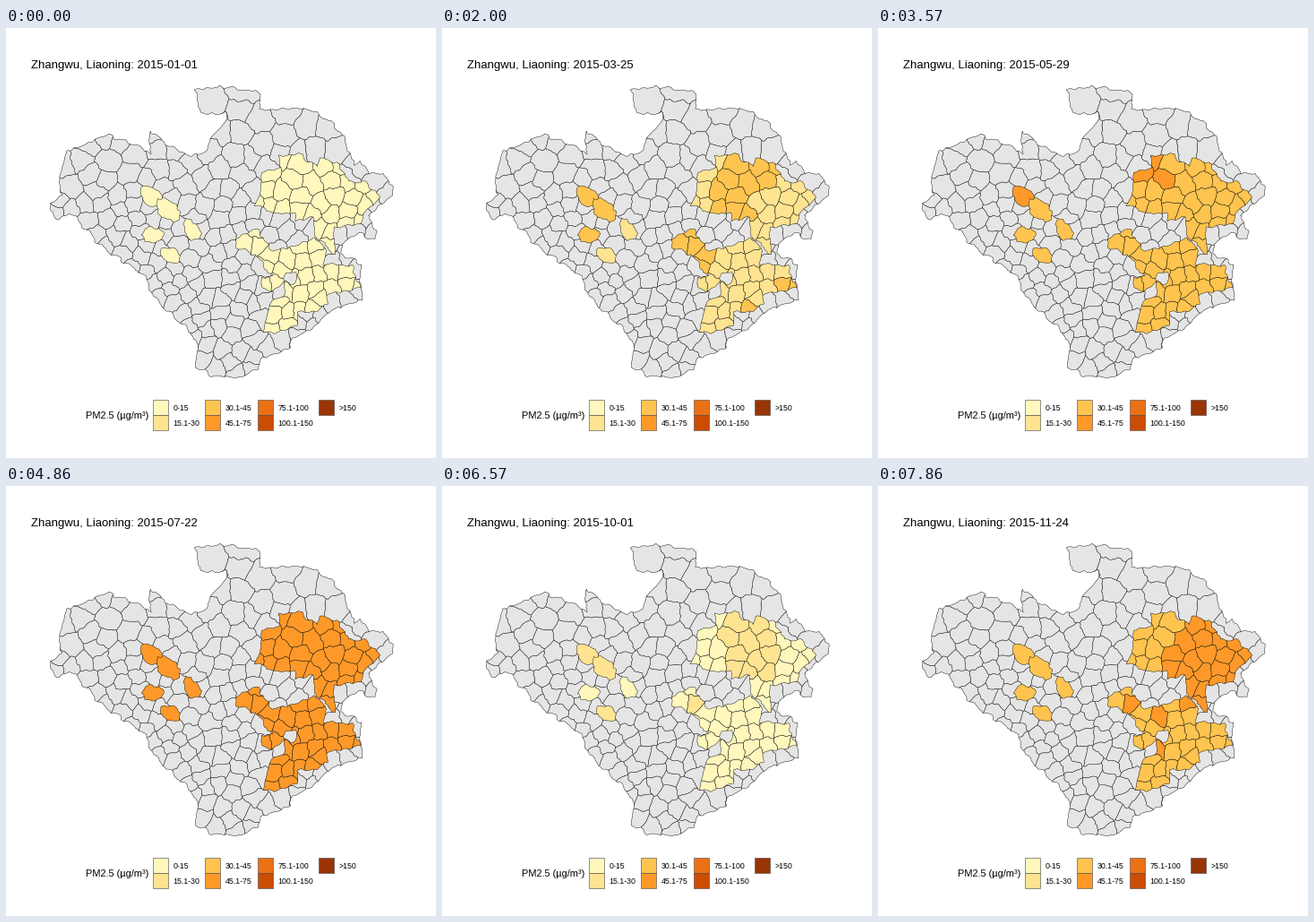
Write a matplotlib script that moves like this. It is 480x480 px and loops after 8 s.

```python
import numpy as np
import matplotlib.pyplot as plt
from matplotlib.animation import FuncAnimation
from matplotlib.collections import PolyCollection
from matplotlib.patches import Polygon, Rectangle
from matplotlib.path import Path

SIZE, LOOP_MS, TICK_MS = 480, 8000, 40
STEPS, DAYS_PER_STEP = 56, 5.938
START = np.datetime64("2015-01-01")
GREY, INK, LINE = "#e5e5e5", "black", 0.42
RAMP = np.array(["#fff7bc", "#fee391", "#fec44f", "#fe9929",
                 "#ec7014", "#cc4c02", "#993404"])
LABELS = ["0-15", "15.1-30", "30.1-45", "45.1-75",
          "75.1-100", "100.1-150", ">150"]

plt.rcParams["font.family"] = "Liberation Sans"
rng = np.random.default_rng(15)

# Key corners; the noise in rough() supplies the ragged detail.
REGION = [
    (48, 197), (63, 187), (59, 166), (66, 138), (95, 127), (113, 119),
    (150, 133), (162, 141), (161, 114), (179, 130), (205, 143), (224, 138),
    (229, 122), (247, 102), (245, 96), (218, 95), (210, 69), (238, 65),
    (285, 72), (282, 91), (338, 90), (366, 107), (377, 122), (388, 153),
    (396, 149), (405, 162), (420, 163), (432, 176), (430, 188), (403, 210),
    (414, 226), (411, 237), (393, 229), (374, 241), (374, 252), (398, 264),
    (394, 284), (399, 303), (364, 314), (345, 333), (317, 349), (318, 357),
    (283, 370), (280, 381), (262, 390), (233, 389), (212, 378), (215, 358),
    (207, 340), (168, 304), (154, 276), (108, 245), (72, 206), (57, 214)]
NORTH_EAST = [
    (304, 143), (326, 140), (347, 155), (350, 144), (372, 152), (382, 171),
    (403, 172), (417, 190), (400, 206), (397, 218), (367, 222), (367, 253),
    (346, 232), (341, 211), (322, 216), (322, 206), (300, 207), (278, 197),
    (285, 186), (286, 161), (304, 157)]
SOUTH_EAST = [
    (346, 234), (358, 249), (355, 264), (386, 265), (395, 290), (358, 297),
    (361, 306), (345, 317), (324, 317), (326, 331), (298, 342), (289, 338),
    (296, 306), (310, 298), (311, 284), (296, 294), (286, 290), (286, 279),
    (297, 277), (279, 254), (257, 244), (257, 235), (275, 226), (282, 224),
    (294, 248), (312, 247)]

# (step, class of most counties, hot spots one class higher as x, y, radius)
KEYS = [
    (0, 0, []),
    (9, 0, [(162, 188, 9), (338, 309, 9)]),
    (20, 3, []),
    (25, 2, [(162, 188, 9), (306, 158, 20)]),
    (34, 3, []),
    (46, 0, [(172, 195, 14), (184, 254, 9), (283, 238, 10), (348, 183, 36)]),
    (55, 2, [(375, 197, 56), (283, 238, 9), (317, 253, 9), (315, 294, 8)]),
]

WAVES = [(wl, *rng.uniform(0, 2 * np.pi, 3)) for wl in (5, 6.5, 9, 13, 19)]


def rough(corners):
    """Subdivide a closed polygon and shake it with a fixed noise field."""
    p = np.asarray(corners, float)
    parts = []
    for a, b in zip(p, np.roll(p, -1, axis=0)):
        n = max(1, int(np.hypot(*(b - a)) / 1.2))
        parts.append(a + (b - a) * (np.arange(n) / n)[:, None])
    pts = np.vstack(parts)
    out = pts.copy()
    for wl, turn, push, phase in WAVES:
        k = 2 * np.pi / wl
        s = np.sin(k * (pts @ [np.cos(turn), np.sin(turn)]) + phase)
        out += 0.065 * wl * s[:, None] * [np.cos(push), np.sin(push)]
    return out


def blob(x, y, a, b, tilt=0):
    """Eight-cornered oval, tilted by degrees."""
    t, r = np.arange(8) * np.pi / 4, np.radians(tilt)
    u, v = a * np.cos(t), b * np.sin(t)
    return np.column_stack([x + u * np.cos(r) - v * np.sin(r),
                            y + u * np.sin(r) + v * np.cos(r)])


def scatter(edge, gaps=()):
    """Spaced random county centres; counties shrink towards the south."""
    darts = rng.uniform(np.min(edge, axis=0), np.max(edge, axis=0), (9000, 2))
    ok = Path(edge).contains_points(darts)
    for g in gaps:
        ok &= ~Path(g).contains_points(darts)
    seeds = []
    for p in darts[ok]:
        gap = np.interp(p[1], [80, 200, 280], [21, 14.5, 13])
        if not seeds or np.hypot(*(np.array(seeds) - p).T).min() > gap:
            seeds.append(p)
    return np.array(seeds)


def voronoi(seeds):
    """Roughened Voronoi cells, each cut from a box around its seed."""
    box = np.array([(-60, -60), (60, -60), (60, 60), (-60, 60)])
    cells = []
    for s in seeds:
        poly = s + box
        near = np.argsort(np.hypot(*(seeds - s).T))[1:32]
        for o in seeds[near]:
            d = (poly - (s + o) / 2) @ (o - s)
            cut = []
            for p, q, dp, dq in zip(poly, np.roll(poly, -1, axis=0),
                                    d, np.roll(d, -1)):
                if dp <= 0:
                    cut.append(p)
                if dp * dq < 0:
                    cut.append(p + (q - p) * dp / (dp - dq))
            poly = np.array(cut)
        cells.append(rough(poly))
    return cells


fig = plt.figure(figsize=(SIZE / 72, SIZE / 72), dpi=72, facecolor="white")
ax = fig.add_axes([0, 0, 1, 1])
ax.set(xlim=(0, SIZE), ylim=(SIZE, 0))
ax.axis("off")


def add_cells(polys, z, edge=None):
    cells = PolyCollection(polys, facecolors=GREY, edgecolors=INK,
                           linewidths=LINE, zorder=z)
    ax.add_collection(cells, autolim=False)
    if edge is not None:
        edge = rough(edge)
        cells.set_clip_path(Path(edge), ax.transData)
        ax.add_patch(Polygon(edge, fc="none", ec=INK, lw=LINE, zorder=z + 1))
    return cells


def class_table(centres):
    """Continuous class of each county (columns) on each key step (rows)."""
    x, y = centres.T
    stagger = 0.5 + 0.4 * np.sin(x / 23 + y / 31)
    rows = []
    for _, base, spots in KEYS:
        hot = np.zeros(len(x), bool)
        for sx, sy, r in spots:
            hot |= np.hypot(x - sx, y - sy) < r
        rows.append(base + stagger + hot)
    return np.array(rows)


west = [blob(162, 188, 15, 10, 35), blob(181, 203, 17, 10, 40),
        blob(163, 231, 12, 9), blob(207, 225, 14, 8, 55),
        blob(184, 254, 13, 8, 30)]

add_cells(voronoi(scatter(REGION, [NORTH_EAST, SOUTH_EAST, *west])), 1, REGION)
groups = []
for block in (NORTH_EAST, SOUTH_EAST):
    seeds = scatter(block)
    groups.append((add_cells(voronoi(seeds), 3, block), class_table(seeds)))
groups.append((add_cells([rough(w) for w in west], 3),
               class_table(np.mean(west, axis=1))))
add_cells([rough(blob(317, 279, 7, 7))], 5)

title = ax.text(28, 45, "", fontsize=13.1)
ax.text(89, 436, "PM2.5 (\u00b5g/m\u00b3)", fontsize=11)
for i, (color, label) in enumerate(zip(RAMP, LABELS)):
    x, y = (164.5, 222.5, 281.5, 349.5)[i // 2], 415.5 + 17 * (i % 2)
    ax.add_patch(Rectangle((x, y), 17, 17, fc=color, ec="#4d4d4d", lw=0.6,
                           snap=False))
    ax.text(x + 22, y + 11.5, label, fontsize=8.8)

key_steps = [k[0] for k in KEYS]


def update(i):
    # Reading the clock at mid-tick puts each step on its nearest tick.
    step = int((i + 0.5) * TICK_MS * STEPS / LOOP_MS)
    title.set_text("Zhangwu, Liaoning: "
                   f"{START + int(round(step * DAYS_PER_STEP))}")
    for cells, table in groups:
        now = [np.interp(step, key_steps, county) for county in table.T]
        cells.set_facecolor(RAMP[np.floor(now).astype(int)])
    return [title, *(cells for cells, _ in groups)]


anim = FuncAnimation(fig, update, frames=LOOP_MS // TICK_MS,
                     interval=TICK_MS, repeat=True, repeat_delay=0)
plt.show()
```
